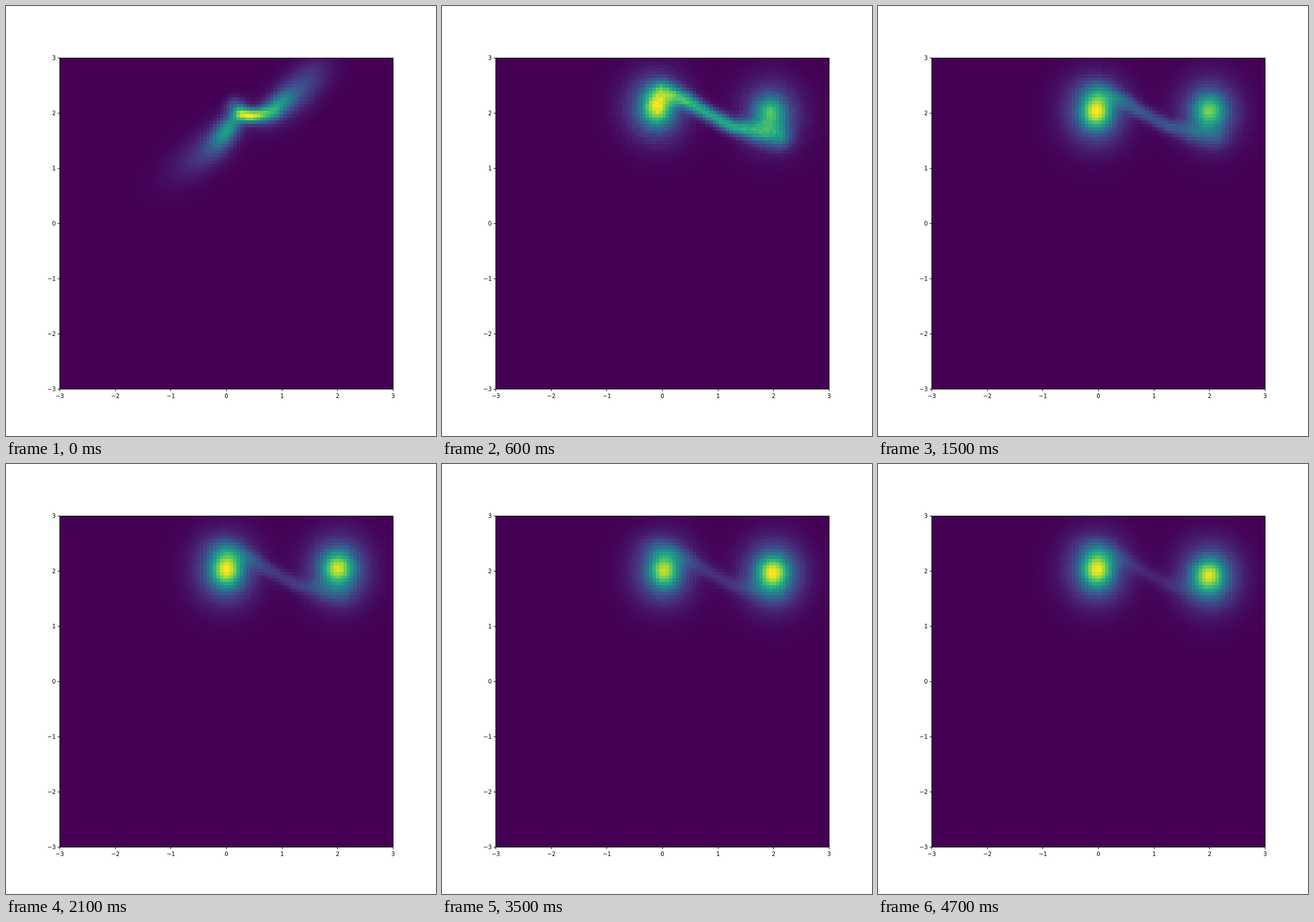
Animation of 748 by 748 pixels, one loop 4800 ms. Source, as an HTML page with a canvas:

```html
<!DOCTYPE html>
<html lang="en">
<head>
<meta charset="utf-8">
<title>Density map</title>
<style>
html, body { margin: 0; width: 100%; height: 100%; overflow: hidden; background: #fff; }
canvas { position: absolute; left: 93px; top: 90px; width: 581px; height: 576px; image-rendering: pixelated; }
svg { position: absolute; left: 0; top: 0; font: 10px "DejaVu Sans", sans-serif; }
</style>
</head>
<body>
<canvas id="map" width="100" height="100"></canvas>
<svg id="axes" width="748" height="748" viewBox="0 0 748 748"></svg>
<script>
const N = 100, LOOP = 4800, STEP = 100;

// Axes: spines, ticks and labels
const toX = v => 383.5 + v * 580 / 6;
const toY = v => 378.5 - v * 96;
let marks = '<path fill="none" stroke="#000" shape-rendering="crispEdges" d="M93.5 90.5H673.5V666.5H93.5Z';
let labels = '';
for (let v = -3; v <= 3; v++) {
  const x = toX(v), y = toY(v), text = String(v).replace('-', '\u2212');
  marks += `M${Math.floor(x) + 0.5} 667v3M93 ${y}h-3`;
  labels += `<text x="${x}" y="681.5" text-anchor="middle">${text}</text>` +
            `<text x="86.5" y="${y + 3.3}" text-anchor="end">${text}</text>`;
}
document.getElementById('axes').innerHTML = marks + '"/>' + labels;

// Colour scale
const stops = ['440154', '472d7b', '3b528b', '2c728e', '21918c', '28ae80', '5ec962', 'addc30', 'fde725']
  .map(h => [0, 2, 4].map(i => parseInt(h.slice(i, i + 2), 16)));
const mix = (a, b, k) => Array.isArray(a) ? a.map((v, i) => mix(v, b[i], k)) : a + (b - a) * k;
function colour(v) {
  const s = Math.min(1, Math.max(0, v)) * 8, i = Math.min(7, Math.floor(s));
  return mix(stops[i], stops[i + 1], s - i);
}

// A pose is [blobs, ridge]
// blob: x, y, sigma along, sigma across, angle, height
// ridge point: x, y, sigma, height
const start = [
  [[0.04, 1.74, 0.26, 0.12, 54, 0.36],
   [-0.12, 1.52, 0.34, 0.18, 48, 0.16],
   [-0.5, 1.22, 0.48, 0.24, 38, 0.1],
   [0.92, 2.13, 0.25, 0.13, 42, 0.36],
   [1.3, 2.42, 0.46, 0.22, 46, 0.2]],
  [[0.14, 2.12, 0.11, 0.22],
   [0.28, 1.98, 0.09, 0.68],
   [0.42, 1.95, 0.085, 0.86],
   [0.56, 1.96, 0.085, 0.72],
   [0.82, 2.02, 0.1, 0.22]]
];
const spread = [
  [[-0.12, 2.2, 0.23, 0.42, 0, 0.58],
   [-0.08, 1.95, 0.48, 0.7, 0, 0.25],
   [-0.6, 1.25, 0.75, 0.38, 40, 0.1],
   [1.82, 1.95, 0.4, 0.38, 0, 0.43],
   [1.98, 2.05, 0.52, 0.6, 0, 0.3]],
  [[-0.05, 2.42, 0.15, 0.3],
   [0.28, 2.31, 0.14, 0.7],
   [0.7, 2.02, 0.13, 0.9],
   [1.2, 1.74, 0.14, 0.84],
   [1.75, 1.76, 0.17, 0.2]]
];
const settled = (lx, ly, left, rx, ry, right, ridge) => [
  [[lx, ly, 0.18, 0.21, 0, left * 0.62],
   [lx - 0.02, ly, 0.37, 0.41, 0, left * 0.35],
   [-0.06, 2.36, 0.24, 0.14, -20, 0.09],
   [rx, ry, 0.19, 0.2, 0, right * 0.6],
   [rx + 0.01, ry - 0.02, 0.37, 0.41, 0, right * 0.36]],
  [[0, 2.43, 0.12, ridge * 0.5],
   [0.4, 2.24, 0.1, ridge],
   [0.8, 2, 0.09, ridge],
   [1.25, 1.75, 0.09, ridge],
   [2.1, 1.58, 0.15, ridge * 0.6]]
];

// time, grain, pose
const keys = [
  [0, 0.003, start],
  [300, 0.035, spread],
  [600, 0.018, settled(-0.1, 2.1, 1, 1.93, 2, 0.75, 0.58)],
  [900, 0.01, settled(-0.08, 2.03, 1, 1.97, 2.03, 0.66, 0.32)],
  [2100, 0.009, settled(0, 2.02, 1, 2, 2.05, 0.95, 0.14)],
  [3000, 0.009, settled(0.02, 2, 0.86, 1.98, 1.99, 1, 0.11)],
  [3500, 0.009, settled(0.03, 2, 0.89, 1.98, 1.97, 1, 0.11)],
  [4700, 0.009, settled(-0.02, 2.02, 1, 1.98, 1.92, 0.97, 0.08)]
];

function poseAt(t) {
  const i = Math.max(1, keys.findIndex(k => k[0] >= t));
  const a = keys[i - 1], b = keys[i];
  return mix(a, b, (t - a[0]) / (b[0] - a[0]));
}

function blob(x, y, [cx, cy, sx, sy, deg, h]) {
  const r = deg * Math.PI / 180, c = Math.cos(r), s = Math.sin(r);
  const u = ((x - cx) * c + (y - cy) * s) / sx;
  const v = ((y - cy) * c - (x - cx) * s) / sy;
  return h * Math.exp(-(u * u + v * v) / 2);
}

function segment(x, y, a, b) {
  const dx = b[0] - a[0], dy = b[1] - a[1];
  const k = Math.min(1, Math.max(0, ((x - a[0]) * dx + (y - a[1]) * dy) / (dx * dx + dy * dy)));
  const [px, py, w, h] = mix(a, b, k);
  return h * Math.exp(-((x - px) ** 2 + (y - py) ** 2) / (2 * w * w));
}

function density(x, y, [blobs, ridge]) {
  let sum = 0, top = 0;
  for (const b of blobs) sum += blob(x, y, b);
  for (let i = 1; i < ridge.length; i++) top = Math.max(top, segment(x, y, ridge[i - 1], ridge[i]));
  return sum + top;
}

function seeded(seed) {
  return () => {
    seed = (seed + 0x6D2B79F5) | 0;
    let z = Math.imul(seed ^ (seed >>> 15), 1 | seed);
    z = (z + Math.imul(z ^ (z >>> 7), 61 | z)) ^ z;
    return ((z ^ (z >>> 14)) >>> 0) / 4294967296;
  };
}

const ctx = document.getElementById('map').getContext('2d');
const image = ctx.createImageData(N, N);
const field = new Float64Array(N * N);

function draw(t) {
  const [, grain, pose] = poseAt(t), random = seeded(t + 17);
  let peak = 0;
  for (let i = 0; i < N * N; i++) {
    const x = -3 + (i % N + 0.5) * 6 / N, y = 3 - (Math.floor(i / N) + 0.5) * 6 / N;
    field[i] = density(x, y, pose);
    peak = Math.max(peak, field[i]);
  }
  for (let i = 0; i < N * N; i++) {
    const v = field[i] / peak;
    const noise = (random() + random() + random() - 1.5) * 2 * grain * Math.sqrt(v);
    image.data.set([...colour(v + noise), 255], i * 4);
  }
  ctx.putImageData(image, 0, 0);
}

const began = performance.now();
let shown = -1;
function tick() {
  const t = Math.floor(((performance.now() - began) % LOOP) / STEP) * STEP;
  if (t !== shown) draw(shown = t);
  requestAnimationFrame(tick);
}
tick();
</script>
</body>
</html>
```
